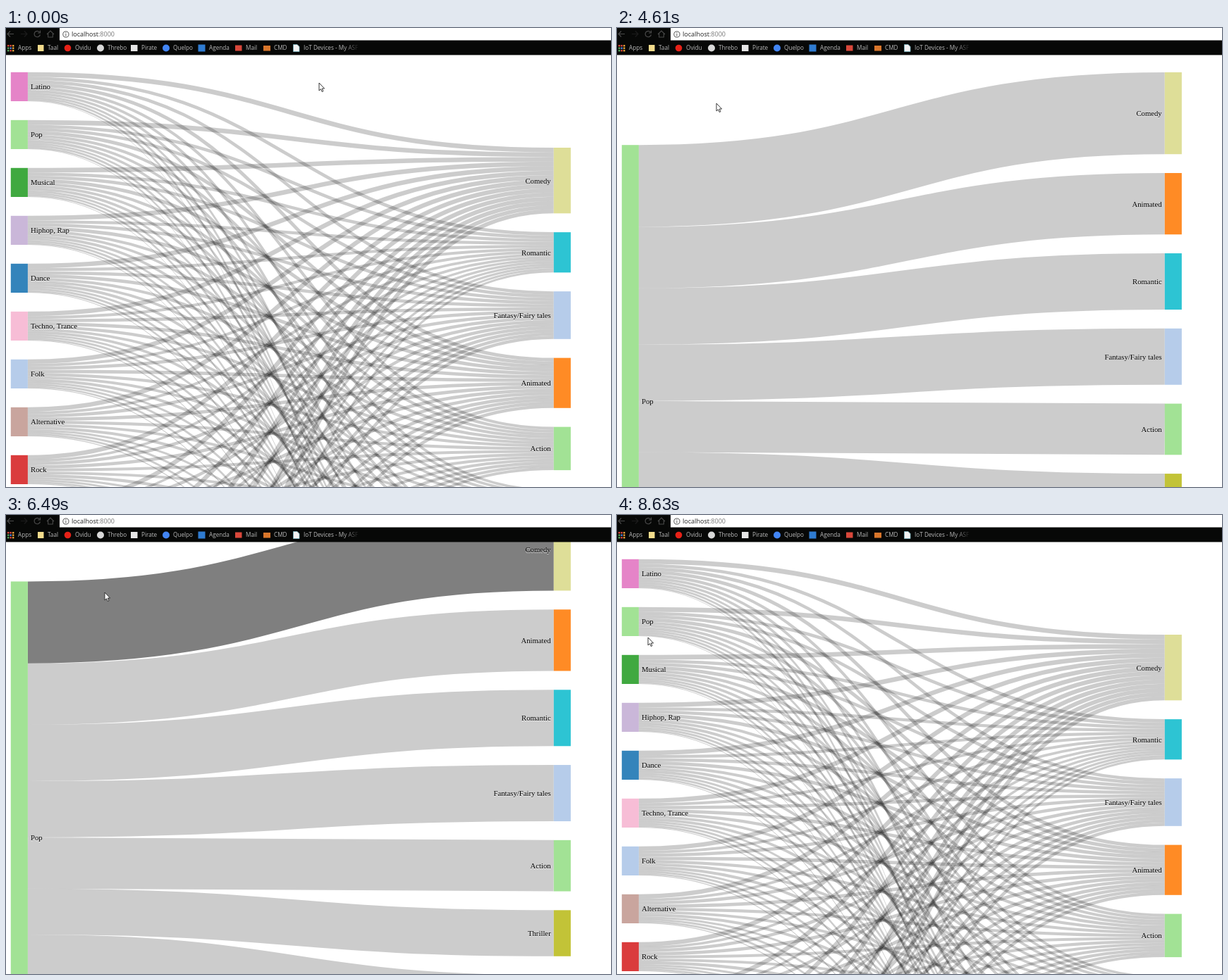
An HTML page with a canvas that plays this animation: 858 by 652 pixels, repeating every 9.26 s.

```html
<!DOCTYPE html>
<html lang="en">
<head>
<meta charset="utf-8">
<title>Music and film genres</title>
<style>
  html, body { margin: 0; width: 100%; height: 100%; overflow: hidden; background: #fff; }
  canvas { display: block; }
</style>
</head>
<body>
<canvas id="stage" width="858" height="652"></canvas>
<script>
const ctx = document.getElementById('stage').getContext('2d');
const LOOP = 9260, TOP = 38.4, LEFT = 6.8, RIGHT = 776.8, NODE_W = 24.1, GAP = 26.8;

const music = [
  ['Latino', '#e377c2'], ['Pop', '#98df8a'], ['Musical', '#2ca02c'], ['Hiphop, Rap', '#c5b0d5'],
  ['Dance', '#1f77b4'], ['Techno, Trance', '#f7b6d2'], ['Folk', '#aec7e8'], ['Alternative', '#c49c94'],
  ['Rock', '#d62728'], ['Punk', '#9467bd'], ['Reggae', '#8c564b'], ['Swing, Jazz', '#ff9896'],
  ['Metal', '#7f7f7f'], ['Classical', '#bcbd22'], ['Opera', '#17becf']
].map(([name, color]) => ({ name, color }));

// Shares in percent: average over all music genres, and for Pop alone.
const films = [
  ['Comedy', '#dbdb8d', 15.1, 16], ['Romantic', '#17becf', 9.26, 11],
  ['Fantasy/Fairy tales', '#aec7e8', 10.95, 11], ['Animated', '#ff7f0e', 11.52, 12],
  ['Action', '#98df8a', 9.95, 10], ['Thriller', '#bcbd22', 9.2, 9],
  ['Documentary', '#ffbb78', 9.9, 9], ['Sci-fi', '#9edae5', 7.4, 7],
  ['War', '#1f77b4', 7.2, 7], ['Horror', '#c7c7c7', 6.52, 6], ['Western', '#e7969c', 3, 2]
].map(([name, color, average, pop]) => ({ name, color, average, pop }));

// The taste drifts evenly from the upper music genres to the lower ones.
const drifting = (film, row) => film.average + (film.pop - film.average) * (7 - row) / 6;
const popOnly = film => film.pop;

function sankey(sources, targets, share, unit, leftTop, rightTop) {
  const stack = (items, x, top, height) => items.map(item => {
    const node = { ...item, x, y: top, h: height(item), used: 0 };
    top += node.h + GAP;
    return node;
  });
  const total = film => sources.reduce((sum, _, row) => sum + share(film, row), 0);
  const left = stack(sources, LEFT, leftTop, () => 100 * unit);
  const right = stack(targets, RIGHT, rightTop, film => total(film) * unit);
  const links = [];
  left.forEach((s, row) => {
    for (const f of right) {
      const width = share(f, row) * unit;
      links.push({ name: f.name, width, y0: s.y + s.used + width / 2, y1: f.y + f.used + width / 2 });
      s.used += width;
      f.used += width;
    }
  });
  return { nodes: [...left, ...right], links };
}

const overview = sankey(music, films, drifting, 0.412, 62.8, 170);
const focus = sankey([music[1]], [...films].sort((a, b) => b.pop - a.pop), popOnly, 7.27, 166.2, 62.9);

// Key lists: [time, ...values]
const cursorKeys = [
  [340, 444, 78], [800, 250, 48], [1260, 51, 27], [1480, 149, 27], [1750, 20, 75], [1950, 16, 162],
  [2200, 21, 99], [2340, 38, 109], [2590, 21, 144], [3100, 21, 144], [3520, 20, 520], [3670, 20, 520],
  [4020, 20, 150], [4150, 60, 118], [4300, 140, 107], [4600, 140, 107], [4610, 141, 107],
  [4840, 141, 107], [5310, 140, 110], [6800, 140, 110], [7100, 40, 140], [7390, 17, 208],
  [7630, 17, 208], [8480, 43, 173], [8560, 43, 173], [8630, 44, 174]
];
const scrollKeys = [
  [4840, 0], [5310, 310], [5450, 310], [5540, 378], [5640, 390], [5930, 78], [6420, 78], [6490, 72], [6800, 0]
];
const hoverKeys = [[0, ''], [5000, 'Comedy'], [5130, 'Animated'], [5220, 'Romantic'], [5760, 'Comedy'], [6750, '']];

function tween(keys, t) {
  const i = keys.findIndex(k => k[0] > t);
  if (i === 0) return keys[0].slice(1);
  if (i < 0) return keys[keys.length - 1].slice(1);
  const a = keys[i - 1], b = keys[i], p = (t - a[0]) / (b[0] - a[0]);
  return a.slice(1).map((v, k) => v + (b[k + 1] - v) * p);
}
const latest = (keys, t) => keys.filter(k => k[0] <= t).pop()[1];

function write(text, x, y, font, color, align = 'left') {
  ctx.font = font;
  ctx.fillStyle = color;
  ctx.textAlign = align;
  ctx.fillText(text, x, y);
}

function drawLinks({ links }, hovered) {
  const start = LEFT + NODE_W, mid = (start + RIGHT) / 2;
  for (const l of links) {
    ctx.strokeStyle = `rgba(0,0,0,${l.name === hovered ? 0.5 : 0.2})`;
    ctx.lineWidth = Math.max(0.67, l.width);
    ctx.beginPath();
    ctx.moveTo(start, l.y0);
    ctx.bezierCurveTo(mid, l.y0, mid, l.y1, RIGHT, l.y1);
    ctx.stroke();
  }
}

function drawNodes({ nodes }) {
  const font = '10.72px "Liberation Serif", serif';
  for (const n of nodes) {
    ctx.globalAlpha = 0.9;
    ctx.fillStyle = n.color;
    ctx.fillRect(n.x, n.y, NODE_W, n.h);
    ctx.globalAlpha = 1;
    const onLeft = n.x === LEFT, x = onLeft ? 35 : 772.7, y = n.y + n.h / 2 + 3.9;
    const align = onLeft ? 'left' : 'right';
    write(n.name, x, y + 0.67, font, '#fff', align);
    write(n.name, x, y, font, '#000', align);
  }
}

function outline(d, color, width, fill) {
  const path = new Path2D(d);
  if (fill) { ctx.fillStyle = fill; ctx.fill(path); }
  ctx.strokeStyle = color;
  ctx.lineWidth = width;
  ctx.stroke(path);
}

function box(x, y, w, h, color) {
  ctx.fillStyle = color;
  ctx.fillRect(x, y, w, h);
}

function disc(x, y, r, color) {
  ctx.fillStyle = color;
  ctx.beginPath();
  ctx.arc(x, y, r, 0, 7);
  ctx.fill();
}

function drawBrowser() {
  box(0, 0, 858, TOP, '#070807');
  box(76, 0, 782, 17.5, '#fff');
  outline('M11 8.5H2M6 4.5L2 8.5L6 12.5', '#4a4a4a', 1.2);
  outline('M21 8.5H30M26 4.5L30 8.5L26 12.5', '#1c1c1c', 1.2);
  outline('M47.5 5.8A4.2 4.2 0 1 0 48.4 9.5M48.5 3.5V7H45', '#4a4a4a', 1.2);
  outline('M58 9L63 4L68 9M59.7 8V13H66.3V8', '#4a4a4a', 1.1);
  outline('M89 9A4.1 4.1 0 1 1 80.8 9A4.1 4.1 0 1 1 89 9M84.9 8.2V11.5M84.9 6.2V7.3', '#444', 0.9);
  const address = '9.05px "Open Sans", sans-serif';
  write('localhost', 93, 12, address, '#222');
  write(':8000', 93 + ctx.measureText('localhost').width, 12, address, '#777');

  const dots = ['#e0483c', '#e0483c', '#e8a33a', '#57a55a', '#4c86e0', '#e8a33a', '#57a55a', '#e0483c', '#e8a33a'];
  dots.forEach((c, i) => box(2 + i % 3 * 3.5, 24 + Math.floor(i / 3) * 3.5, 2.4, 2.4, c));
  box(45, 24, 8.5, 9, '#f3dc8c');
  disc(87.5, 28.5, 4.8, '#e62117');
  disc(134, 28.5, 5, '#d8d8d8');
  box(177, 24, 9.5, 9, '#e6e6e6');
  disc(227, 28.5, 5, '#4285f4');
  box(272.5, 23.5, 10, 10, '#2f7bd0');
  box(325, 24.5, 9.5, 8, '#d9483b');
  box(365, 25, 10, 7.5, '#d9762b');
  outline('M407.5 23.5H413L416 26.5V33.5H407.5Z', '#79b8c4', 0.8, '#f2f2f2');

  const marks = [['Apps', 17], ['Taal', 59], ['Ovidu', 98], ['Threbo', 144], ['Pirate', 192], ['Quelpo', 237],
    ['Agenda', 288], ['Mail', 340], ['CMD', 380]];
  const font = '8.2px "Open Sans", sans-serif';
  for (const [text, x] of marks) write(text, x, 31.2, font, '#b9b9b9');
  const fade = ctx.createLinearGradient(480, 0, 498, 0);
  fade.addColorStop(0, '#b9b9b9');
  fade.addColorStop(1, '#222');
  write('IoT Devices - My ASF', 422, 31.2, font, fade);
}

function drawCursor(x, y, moving) {
  ctx.save();
  ctx.translate(x, y);
  ctx.lineJoin = 'round';
  if (moving) {
    for (let i = 0; i < 4; i++) {
      outline('M-1 -1.4V-4.2H-3.2L0 -7.4L3.2 -4.2H1V-1.4Z', '#222', 0.9, '#fff');
      ctx.rotate(Math.PI / 2);
    }
    box(-1, -1, 2, 2, '#fff');
    outline('M-1.5 -1.5H1.5V1.5H-1.5Z', '#222', 0.7);
  } else {
    outline('M0 0V11L2.5 8.7L4.2 12.5L5.9 11.8L4.3 8H7.6Z', '#222', 0.9, '#fff');
  }
  ctx.restore();
}

function draw(t) {
  const [scroll] = tween(scrollKeys, t), [x, y] = tween(cursorKeys, t);
  const shown = [];
  if (t >= 2970 && t < 8050) shown.push(focus);
  if (t < 3300) shown.unshift(overview);
  if (t >= 7720) shown.push(overview);
  const linked = t < 2890 || t >= 7720 ? overview : t >= 2970 && t < 7560 ? focus : null;

  box(0, 0, 858, 652, '#fff');
  ctx.save();
  ctx.translate(0, -scroll);
  if (linked) drawLinks(linked, latest(hoverKeys, t));
  shown.forEach(drawNodes);
  ctx.restore();
  drawBrowser();

  const overNode = shown.some(s => s.nodes.some(n =>
    x >= n.x && x <= n.x + NODE_W && y + scroll >= n.y && y + scroll <= n.y + n.h));
  drawCursor(x, y, overNode);
}

const start = performance.now();
function tick() {
  draw((performance.now() - start) % LOOP);
  requestAnimationFrame(tick);
}
tick();
</script>
</body>
</html>
```
